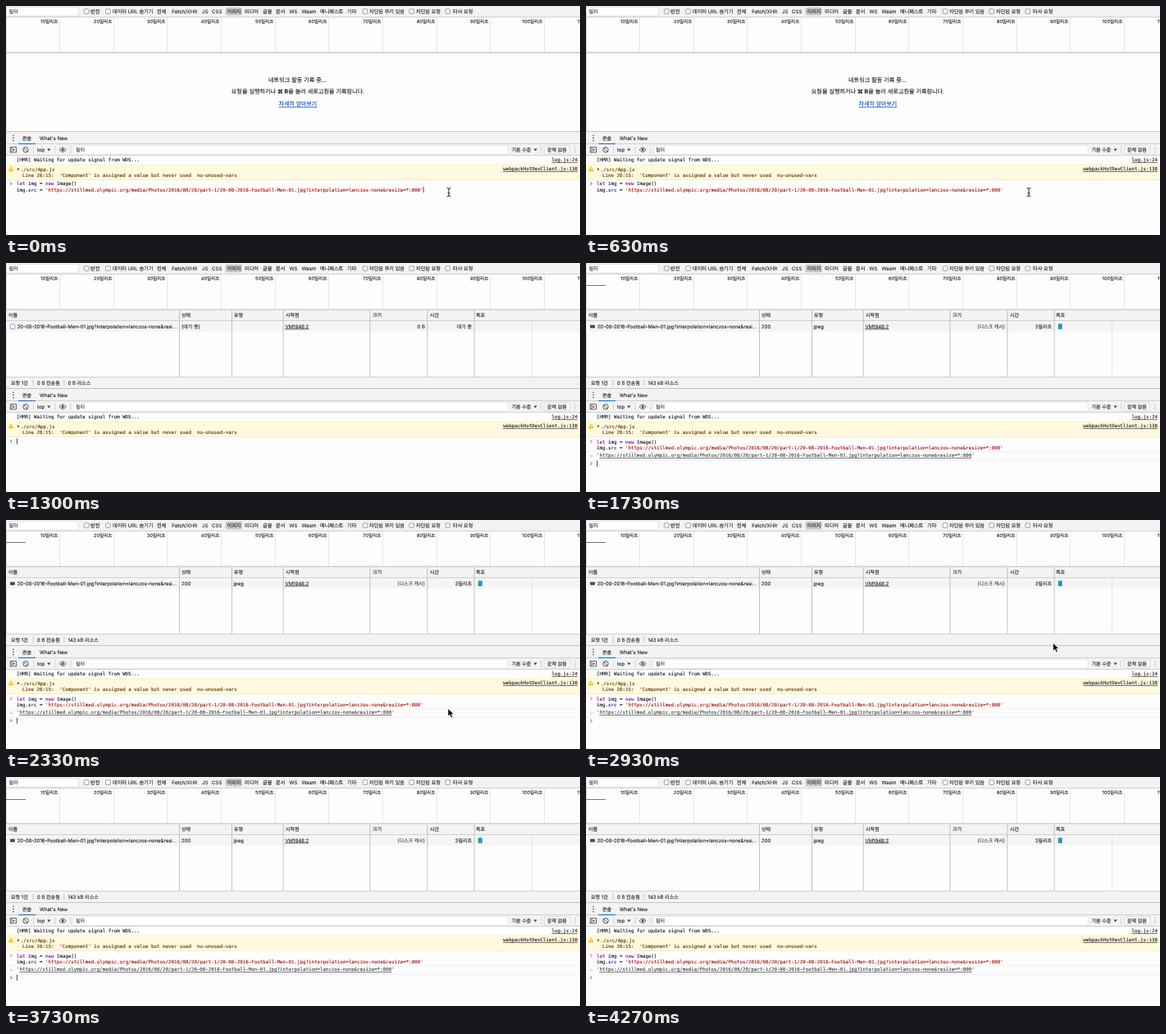
Write an HTML page that moves like this. It is 700x280 px and loops after 4.31 s.

```html
<!DOCTYPE html>
<html lang="ko">
<head>
<meta charset="utf-8">
<style>
  html, body { margin: 0; width: 100%; height: 100%; overflow: hidden; background: #fdfdfd; }
  svg { display: block; width: 700px; height: 280px; }
  text { font-family: Inter, "Noto Sans CJK KR", sans-serif; font-size: 6px; color: #28292c;
         white-space: pre; text-rendering: geometricPrecision; }
  text, tspan { fill: currentColor; stroke: currentColor; stroke-width: .13px; }
  .mono { font-family: "DejaVu Sans Mono", monospace; font-size: 5.8px; color: #222; }
  .bar { font-size: 6.15px; }
  .tick { font-size: 5.6px; text-anchor: end; }
  .big { font-size: 7.1px; text-anchor: middle; }
  .end { text-anchor: end; }
  .link { text-decoration: underline; }
</style>
</head>
<body>
<svg id="stage" viewBox="0 0 700 280" xmlns="http://www.w3.org/2000/svg"></svg>
<script>
const LOOP = 4310;
const ENTER = 1275, ECHO = 1345, LOADED = 1405;
const POINTER_SHOWN = 2230;
const PAGE = "#fdfdfd", CHROME = "#f3f3f3", PROMPT = "#3a6fd0";
const URL_TEXT = "https://stillmed.olympic.org/media/Photos/2016/08/20/part-1/" +
  "20-08-2016-Football-Men-01.jpg?interpolation=lanczos-none&amp;resize=*:800";
// time, x, y of the arrow tip
const POINTER_PATH = [[2230, 539, 230.5], [2400, 539, 230.5], [2930, 569.5, 150.5],
  [3220, 587, 105], [3500, 622, -14]];

const text = (x, y, s, cls = "", color = "") =>
  `<text x="${x}" y="${y}" class="${cls}"${color && ` style="color:${color}"`}>${s}</text>`;
const tint = (color, s) => `<tspan style="color:${color}">${s}</tspan>`;
const rect = (x, y, w, h, fill, attrs = "") =>
  `<rect x="${x}" y="${y}" width="${w}" height="${h}" fill="${fill}" ${attrs}/>`;
const path = (d, stroke, width = 1, fill = "none") =>
  `<path d="${d}" stroke="${stroke}" stroke-width="${width}" fill="${fill}"/>`;
const hline = (y, color) => rect(0, y, 700, 1, color);
const vline = (x, y, h, color) => rect(x, y, 0.8, h, color);
const group = (id, body) => `<g id="${id}">${body}</g>`;
const checkbox = x => rect(x - 2.8, 3.8, 5.6, 5.6, "#fff", 'rx="1" stroke="#767676" stroke-width=".7"');
const chevron = (y, color) => path(`M5 ${y - 1.8}l2.4 1.8l-2.4 1.8`, color, 0.9);
const downArrow = (x, y) => path(`M${x} ${y}h4.2l-2.1 3z`, "none", 0, "#444");

function filterBar() {
  const labels = [[103, "반전"], [130, "데이터 URL 숨기기"], [184, "전체"], [202.3, "Fetch/XHR"],
    [239, "JS"], [251, "CSS"], [269.5, "이미지"], [291, "미디어"], [313, "글꼴"], [329, "문서"],
    [345.5, "WS"], [360.5, "Wasm"], [383, "매니페스트"], [416, "기타"],
    [443, "차단된 쿠키 있음"], [500, "차단된 요청"], [545, "타사 요청"]];
  return rect(0, 0, 700, 13.5, CHROME) +
    rect(0.5, 1.5, 88, 10.5, "#fff", 'stroke="#d4d4d4" stroke-width=".6"') +
    text(3.5, 9, "필터", "bar", "#444") +
    rect(267.5, 1.8, 20.5, 9.8, "#c9c9c9", 'rx="2.5"') +
    [98.2, 124.5, 438, 494.7, 538.8].map(checkbox).join("") +
    labels.map(([x, s]) => text(x, 8.9, s, "bar")).join("") +
    hline(13, "#d0d0d0");
}

function ruler() {
  let out = "";
  for (let i = 1; i <= 11; i++) {
    const x = Math.floor(i * 65.65);
    out += vline(x, 14, 43, "#e2e2e2") + text(x - 1.6, 21.4, i * 10 + "밀리초", "tick");
  }
  return out + rect(0, 56.4, 700, 1.2, "#bdbdbd") + vline(0, 14, 140, "#d0d0d0");
}

const emptyPanel = () =>
  text(355.5, 92.5, "네트워크 활동 기록 중...", "big") +
  text(356, 107.4, '요청을 실행하거나 <tspan font-weight="700">⌘ R</tspan>을 눌러 새로고침을 기록합니다.', "big") +
  text(356, 122.4, "자세히 알아보기", "big link", "#1155cc;font-size:6.9px");

function requestTable() {
  const heads = [[3, "이름"], [214, "상태"], [278, "유형"], [341, "시작점"], [447, "크기"],
    [517, "시간"], [573, "폭포"]];
  return rect(0, 57.8, 700, 13.2, CHROME) +
    rect(0, 71, 700, 12.8, "#f5f5f5") +
    hline(70, "#d0d0d0") +
    heads.map(([x, s]) => text(x, 66.2, s)).join("") +
    vline(641, 71, 68.5, "#e0e0e0") +
    [211, 275, 337.7, 443.5, 513.5, 570.7].map(x => vline(x, 58, 81.5, "#b4b4b4")).join("") +
    text(13.7, 79.5, "20-08-2016-Football-Men-01.jpg?interpolation=lanczos-none&amp;resi…") +
    text(340.5, 79.5, "VM1948:2", "link") +
    rect(0, 139.3, 700, 15, CHROME) + hline(139, "#d0d0d0") +
    text(6, 148.7, "요청 1건") + text(38, 148.7, "0 B 전송됨") +
    vline(32.7, 143, 7, "#bbb") + vline(70.5, 143, 7, "#bbb");
}

const pendingRow = () =>
  rect(5.3, 74.8, 5.4, 5.6, "#fff", 'rx=".6" stroke="#8492c4" stroke-width=".8"') +
  text(214, 79.5, "(대기 중)") +
  text(511, 79.5, "0 B", "end") + text(568, 79.5, "대기 중", "end") +
  text(75.5, 148.7, "0 B 리소스");

const loadedRow = () =>
  rect(5.2, 75.8, 5.4, 3.7, "#1f3a30") + rect(6.8, 76.6, 1.5, 1.7, "#7d9488") +
  text(214, 79.5, "200") + text(277.5, 79.5, "jpeg") +
  text(511, 79.5, "(디스크 캐시)", "end", "#484848") + text(568, 79.5, "3밀리초", "end") +
  rect(575.8, 74.3, 2.2, 6.6, "#22a565") + rect(577.8, 74.3, 3, 6.6, "#2596d8") +
  text(75.5, 148.7, "143 kB 리소스") +
  rect(0, 27, 24, 1, "#777");

function drawer() {
  const dots = [158.2, 161.4, 164.6].map(y => `<circle cx="9" cy="${y}" r=".8" fill="#444"/>`).join("");
  const icons =
    rect(5.2, 172.7, 7.2, 6.2, "none", 'stroke="#444" stroke-width=".8"') +
    path("M7 172.7v6.2", "#444", 0.7) + path("M8.5 174.2l2.5 1.6l-2.5 1.6z", "none", 0, "#444") +
    '<circle cx="24" cy="175.8" r="3.2" fill="none" stroke="#444" stroke-width=".9"/>' +
    path("M21.8 173.6l4.4 4.4", "#444", 0.9) +
    path("M65.2 175.8q4 -5.4 8 0q-4 5.4 -8 0z", "#444", 0.9) +
    '<circle cx="69.2" cy="175.8" r="1.5" fill="#444"/>';
  return rect(0, 153.5, 700, 29.3, CHROME) + hline(153, "#c4c4c4") +
    dots + text(20, 163.7, "콘솔") + text(41, 163.7, "What's New") +
    hline(168, "#d0d0d0") + rect(15, 167.9, 21, 1.2, "#1a73e8") +
    icons + text(38, 178, "top") + downArrow(50.2, 174.5) +
    [33, 59.5, 78.5, 652, 693.5].map(x => vline(x, 171.3, 9, "#ccc")).join("") +
    rect(82.5, 170.5, 529.5, 10.6, "#fff", 'stroke="#d8d8d8" stroke-width=".5"') +
    text(85, 178, "필터", "", "#444") +
    text(616.5, 178, "기본 수준") + downArrow(643.5, 174.5) +
    rect(656.3, 170.8, 31.5, 10, "#f7f7f7", 'rx="1.5" stroke="#c8c8c8" stroke-width=".6"') +
    text(660, 178, "문제 없음") + hline(182, "#d0d0d0");
}

function messages() {
  const brown = "#5c3c00";
  return text(13, 190.2, "[HMR] Waiting for update signal from WDS...", "mono") +
    text(697, 190.2, "log.js:24", "mono end link") +
    rect(0, 194, 700, 18.6, "#fff9e0") + hline(193.7, "#fff0b8") + hline(212, "#fff0b8") +
    path("M6.2 196.8l2.8 5h-5.6z", "#f4bd00", 0.8, "#f4bd00") + rect(5.8, 198.2, 0.8, 2.9, "#fff") +
    path("M14 198l2.4 1.6l-2.4 1.6z", "none", 0, brown) +
    text(17.7, 201.6, "./src/App.js", "mono", brown) +
    text(20, 209.4, "Line 26:15:  'Component' is assigned a value but never used  no-unused-vars", "mono", brown) +
    text(697, 201.3, "webpackHotDevClient.js:138", "mono end link");
}

function code(y) {
  const keyword = s => tint("#8c1290", s), name = s => tint("#1a1a80", s);
  return text(13, y, `${keyword("let")} ${name("img")} = ${keyword("new")} Image()`, "mono") +
    text(13, y + 7.4, `img.${name("src")} = ${tint("#b0120e", `'${URL_TEXT}'`)}`, "mono");
}

const echo = () =>
  chevron(218.4, "#808590") + code(220.5) + hline(230.4, "#f0f0f0") +
  path("M7 234.4l-1.7 1.6l1.7 1.6", "#aaa", 0.8) + '<circle cx="8.2" cy="236" r=".6" fill="#aaa"/>' +
  text(13, 237.4, `'<tspan class="link">${URL_TEXT}</tspan>'`, "mono", "#444") +
  hline(240.8, "#f0f0f0");

const iBeam = () => {
  const d = "M537.6 222.4q2.4 0 2.4 1.8v7q0 1.8 -2.4 1.8M542.4 222.4q-2.4 0 -2.4 1.8M542.4 233q-2.4 0 -2.4 -1.8M538.6 228.8h2.8";
  return path(d, "#fff", 2) + path(d, "#111", 0.9);
};
const arrow = () => path("M0 0v9.6l2.2 -2l1.7 3.8l1.8 -.8l-1.6 -3.7h3z", "#fff", 0.7, "#000");

const stage = document.getElementById("stage");
stage.innerHTML = rect(0, 0, 700, 280, PAGE) + filterBar() + ruler() +
  group("empty", emptyPanel()) +
  group("table", requestTable()) + group("pending", pendingRow()) + group("loaded", loadedRow()) +
  drawer() + messages() +
  group("input", code(219.1)) + group("echo", echo()) +
  group("prompt", chevron(0, PROMPT)) +
  group("caret", rect(0, 0, 0.8, 7.2, "#222")) +
  group("beam", iBeam()) + group("arrow", arrow());

const node = Object.fromEntries([...stage.querySelectorAll("g[id]")].map(g => [g.id, g]));
const show = (id, on) => node[id].setAttribute("visibility", on ? "visible" : "hidden");
const move = (id, x, y) => node[id].setAttribute("transform", `translate(${x} ${y})`);

function pointerAt(t) {
  const next = POINTER_PATH.findIndex(p => p[0] > t);
  if (next < 1) return POINTER_PATH[next < 0 ? POINTER_PATH.length - 1 : 0].slice(1);
  const [t0, x0, y0] = POINTER_PATH[next - 1], [t1, x1, y1] = POINTER_PATH[next];
  const k = (t - t0) / (t1 - t0);
  return [x0 + (x1 - x0) * k, y0 + (y1 - y0) * k];
}

function render(t) {
  const sent = t >= ENTER, echoed = t >= ECHO, loaded = t >= LOADED;
  show("empty", !sent);
  show("table", sent);
  show("pending", sent && !loaded);
  show("loaded", loaded);
  show("input", !sent);
  show("echo", echoed);
  move("prompt", 0, echoed ? 245.4 : sent ? 218 : 217.3);
  move("caret", sent ? 13 : 508.7, echoed ? 241.8 : sent ? 214.4 : 220.9);
  show("caret", sent ? (t - ENTER) % 1000 < 500 : t < 380 || t >= 880);
  show("beam", !sent);
  show("arrow", t >= POINTER_SHOWN && t < 3500);
  move("arrow", ...pointerAt(t));
}

const start = performance.now();
function tick() {
  render((performance.now() - start) % LOOP);
  requestAnimationFrame(tick);
}
tick();
</script>
</body>
</html>
```
